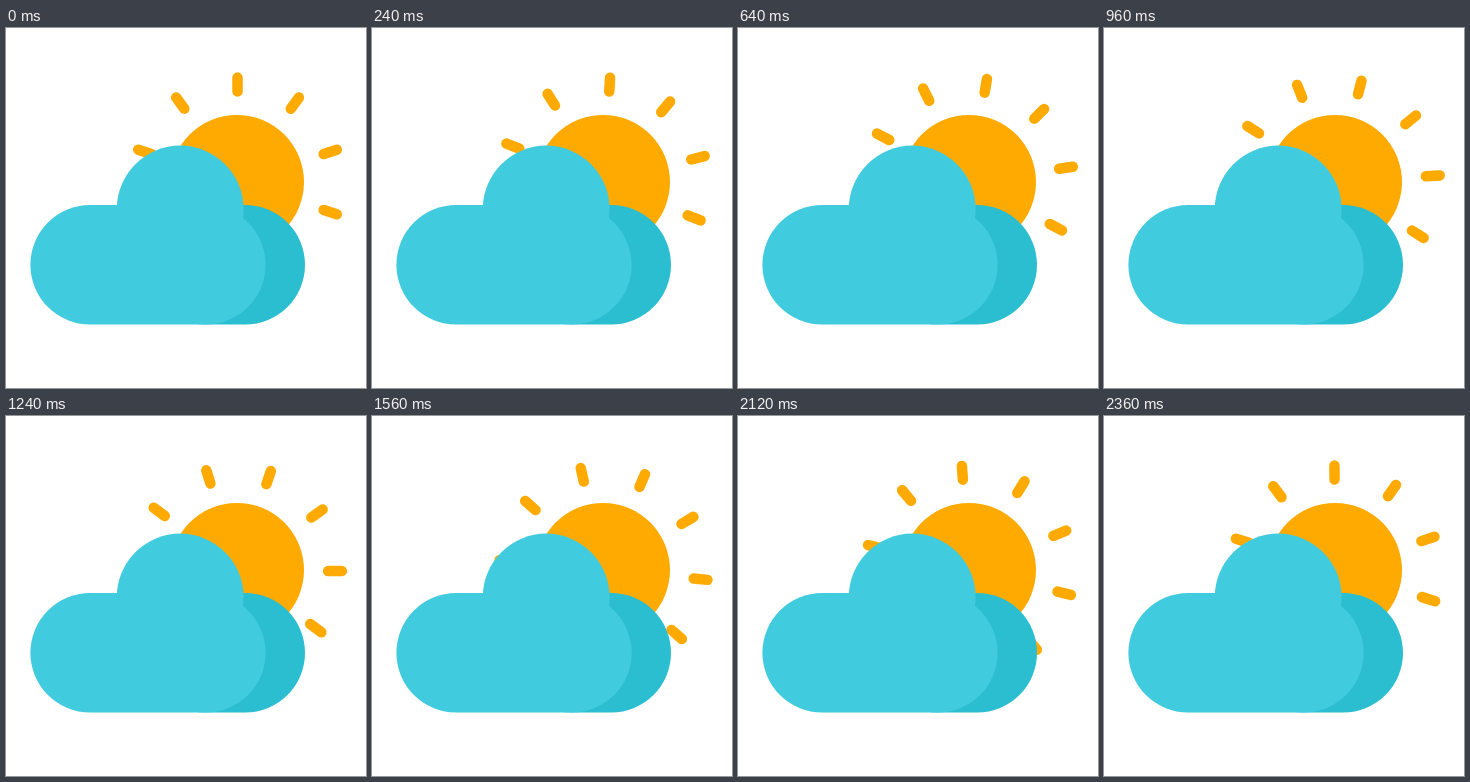
An HTML page that plays this animation: 360 by 360 pixels, repeating every 2.4 s.

```html
<!DOCTYPE html>
<html>
<head>
<meta charset="utf-8">
<title>Sun behind a cloud</title>
<style>
  html, body { margin: 0; height: 100%; overflow: hidden; background: #fff; }
  svg { display: block; width: 100vw; height: 100vh; }
</style>
</head>
<body>
<svg viewBox="0 0 360 360">
  <g id="rays" stroke="#ffaa00" stroke-width="10.5" stroke-linecap="round"></g>
  <circle cx="231" cy="154" r="67" fill="#ffaa00"/>
  <rect x="139" y="177" width="160" height="119.6" rx="59.8" fill="#2abed0"/>
  <g fill="#41cbde">
    <rect x="24.4" y="177" width="235.2" height="119.6" rx="59.8"/>
    <circle cx="174.2" cy="181" r="63.4"/>
  </g>
</svg>
<script>
  const LOOP = 2400, COUNT = 10, STEP = 360 / COUNT;
  const rays = document.getElementById('rays');

  for (let i = 0; i < COUNT; i++) {
    const ray = document.createElementNS('http://www.w3.org/2000/svg', 'path');
    ray.setAttribute('d', 'M0-90.6V-104.4');
    ray.setAttribute('transform', `rotate(${i * STEP})`);
    rays.append(ray);
  }

  // The ring turns by one ray spacing per loop.
  function draw() {
    const angle = (performance.now() % LOOP) / LOOP * STEP;
    rays.setAttribute('transform', `translate(231.5 154) rotate(${angle})`);
    requestAnimationFrame(draw);
  }
  draw();
</script>
</body>
</html>
```
